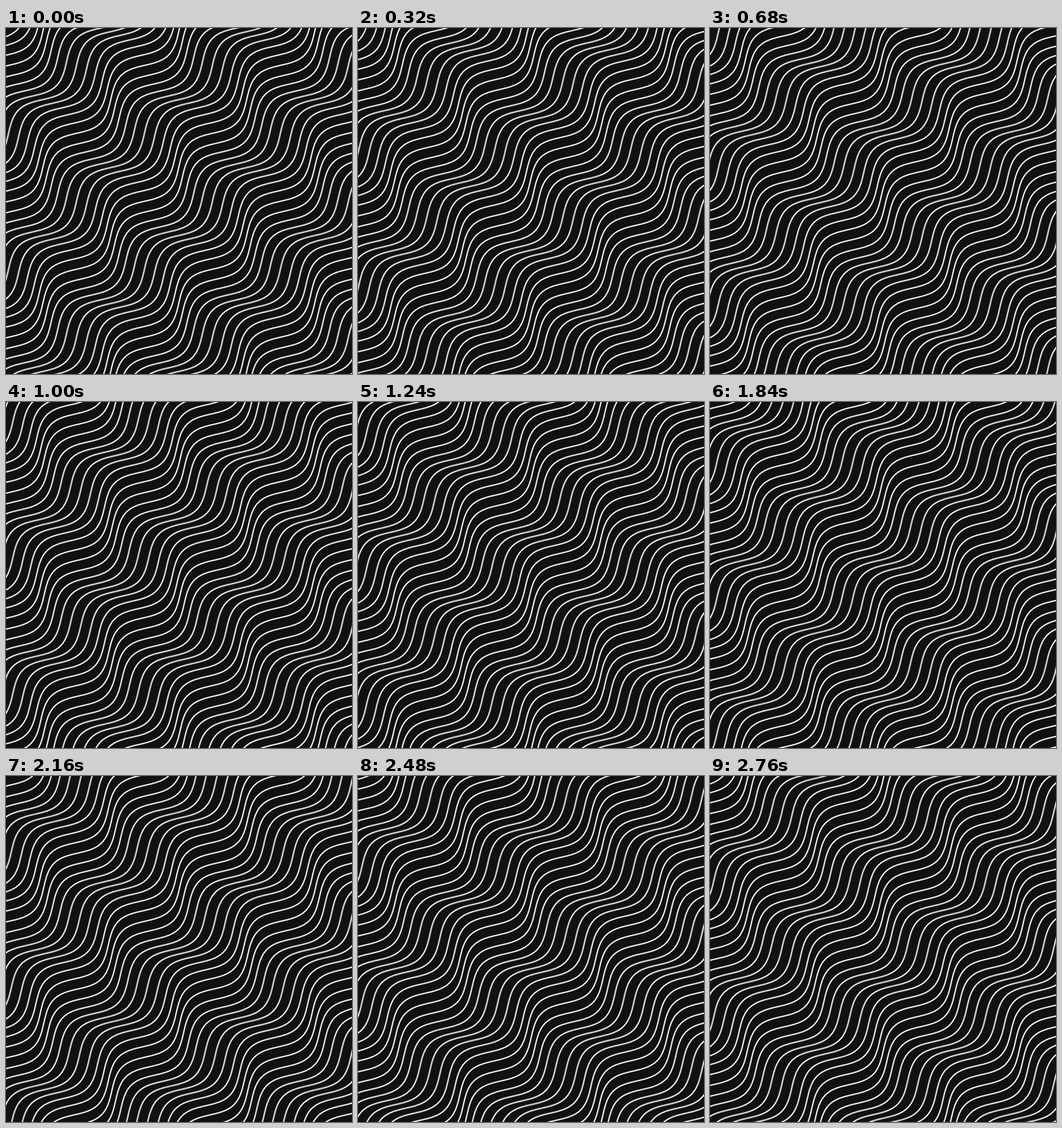
Animation of 540 by 540 pixels, one loop 2.8 s. Source, as an HTML page with a canvas:

```html
<!DOCTYPE html>
<html lang="en">
<head>
<meta charset="utf-8">
<title>Drifting waves</title>
<style>
  html, body { margin: 0; width: 100%; height: 100%; overflow: hidden; background: #111; }
  canvas { display: block; width: 540px; height: 540px; }
</style>
</head>
<body>
<canvas id="stage" width="540" height="540"></canvas>
<script>
const SIZE = 540;
const LOOP = 2800;
const STEP = 40;
const STEPS = LOOP / STEP;
const TAU = Math.PI * 2;

const WAVELENGTH = 150;
const AMPLITUDE = 15;
const SWING = 0.5;      // how far the wave phase sways from line to line
const GAP = WAVELENGTH / 10;
const REACH = 400;      // half the diagonal, with a margin
const BLUR = 8;         // sub-exposures per step

const ctx = document.getElementById('stage').getContext('2d');

function traceLine(base, t) {
  const sway = SWING * Math.cos(TAU * (base / WAVELENGTH - t));
  for (let u = -REACH; u <= REACH; u += 4) {
    const v = base + AMPLITUDE * Math.cos(TAU * (u / WAVELENGTH + t) + sway);
    if (u === -REACH) ctx.moveTo(u, v);
    else ctx.lineTo(u, v);
  }
}

function expose(t) {
  const count = Math.ceil((REACH + AMPLITUDE) / GAP);
  ctx.beginPath();
  for (let i = -count; i < count; i++) traceLine((i + 0.5) * GAP, t);
  ctx.stroke();
}

function draw(step) {
  ctx.setTransform(1, 0, 0, 1, 0, 0);
  ctx.globalCompositeOperation = 'source-over';
  ctx.fillStyle = '#111';
  ctx.fillRect(0, 0, SIZE, SIZE);

  // Sub-exposures add up to white, so faster lines turn softer and greyer.
  ctx.translate(SIZE / 2, SIZE / 2);
  ctx.rotate(-Math.PI / 4);
  ctx.globalCompositeOperation = 'lighter';
  ctx.strokeStyle = 'rgb(29, 29, 29)';
  ctx.lineWidth = 2;
  for (let s = 0; s < BLUR; s++) expose((step + s / BLUR) / STEPS);
}

const start = performance.now();
let shown = -1;

function tick() {
  const step = Math.floor(((performance.now() - start) % LOOP) / STEP);
  if (step !== shown) draw(shown = step);
  requestAnimationFrame(tick);
}
tick();
</script>
</body>
</html>
```
